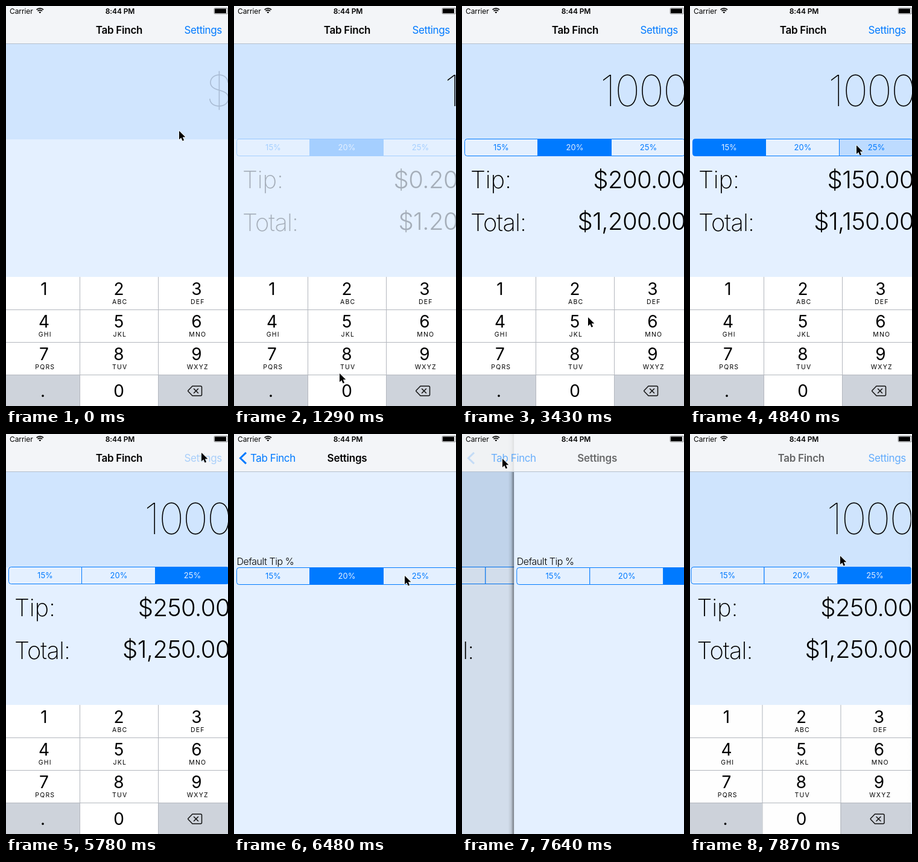
Animation, 368 px wide and 663 px high, one loop 7.99 s. Source, as an HTML page:

```html
<!DOCTYPE html>
<html lang="en">
<head>
<meta charset="utf-8">
<title>Tip calculator</title>
<style>
html, body { margin: 0; width: 100%; height: 100%; overflow: hidden; background: #e4f0ff; }
svg { display: block; width: 368px; height: 663px; font-family: Inter, Roboto, "Open Sans", sans-serif; }
text { white-space: pre; }
.mid { text-anchor: middle; }
.end { text-anchor: end; }
.bar { font-size: 17px; letter-spacing: -.4px; }
.bold { font-weight: 600; letter-spacing: -.25px; }
.blue { fill: #007aff; }
.status { font-size: 12px; letter-spacing: -.1px; }
.amount { font-size: 71px; font-weight: 100; letter-spacing: -2px; }
.label { font-size: 40px; font-weight: 200; }
.value { font-size: 40px; font-weight: 300; letter-spacing: -.6px; }
.digit { font-size: 28px; }
.letters { font-size: 10.5px; letter-spacing: 1.2px; }
.seg { font-size: 13px; }
</style>
</head>
<body>
<svg id="stage" viewBox="0 0 368 663">
  <defs>
    <linearGradient id="shade">
      <stop offset="0" stop-opacity="0"/>
      <stop offset=".5" stop-opacity=".12"/>
      <stop offset="1" stop-opacity=".6"/>
    </linearGradient>
  </defs>

  <g id="main">
    <rect width="375" height="663" fill="#e4f0ff"/>
    <rect y="63" width="375" height="158" fill="#d0e5fe"/>
    <text id="amount" class="amount end" x="373" y="166"></text>
    <g id="result">
      <g id="mainSeg" transform="translate(0 220)"></g>
      <text class="label" x="14" y="302" letter-spacing="-.2">Tip:</text>
      <text class="label" x="14" y="373" letter-spacing="-1">Total:</text>
      <text id="tip" class="value end" x="371" y="302"></text>
      <text id="total" class="value end" x="371" y="371"></text>
    </g>
    <g id="keys"></g>
  </g>
  <rect id="dim" width="368" height="663"/>

  <g id="settings">
    <rect id="edge" x="-10" width="10" height="663" fill="url(#shade)"/>
    <rect width="375" height="663" fill="#e4f0ff"/>
    <text x="4.5" y="217" font-size="16" font-weight="300" letter-spacing="-.45">Default Tip %</text>
    <g id="prefSeg" transform="translate(0 221)"></g>
  </g>

  <rect width="368" height="62" fill="#f7f7f7" fill-opacity=".82"/>
  <rect y="62" width="368" height="1" fill="#b4bfcd"/>
  <text class="status" x="6" y="12.5">Carrier</text>
  <g fill="none" stroke="#000" stroke-width="1.7">
    <path d="M50.6 6.2a8.2 8.2 0 0 1 11.4 0M52.6 8.4a5.3 5.3 0 0 1 7.4 0"/>
    <path d="M56.3 12.2l-1.9-2a2.8 2.8 0 0 1 3.8 0z" fill="#000" stroke="none"/>
  </g>
  <text class="status mid" x="189" y="12.5" font-weight="600">8:44 PM</text>
  <rect x="345" y="3.5" width="22.5" height="9.5" rx="1.5" fill="none" stroke="#666" stroke-width=".8"/>
  <rect x="346" y="4.5" width="19" height="7.5" rx=".5"/>

  <text id="mainTitle" class="bar bold mid" y="46">Tab Finch</text>
  <text id="prefButton" class="bar blue" x="295.5" y="46">Settings</text>
  <path id="chevron" d="M20 30.8L10.5 40l9.5 9.2" fill="none" stroke="#007aff" stroke-width="3"/>
  <text id="back" class="bar blue" y="46">Tab Finch</text>
  <text id="prefTitle" class="bar bold mid" y="46">Settings</text>

  <path id="cursor" d="M0 0V14.2L3.3 11.2L5.6 16.5L8.1 15.4L5.8 10.2H10.3Z" stroke="#fff" stroke-width="1.3" paint-order="stroke"/>
</svg>

<script>
const LOOP = 7990, WIDTH = 375;
const $ = id => document.getElementById(id);
const clamp = v => Math.max(0, Math.min(1, v));

function add(parent, tag, attrs, text) {
  const el = document.createElementNS("http://www.w3.org/2000/svg", tag);
  for (const k in attrs) el.setAttribute(k, attrs[k]);
  if (text) el.textContent = text;
  return parent.appendChild(el);
}
const set = (id, name, value) => $(id).setAttribute(name, value);
const alpha = (id, value) => set(id, "opacity", value);
const shift = (id, x, y = 0) => set(id, "transform", `translate(${x} ${y})`);

// Segmented control: returns a function that shows the chosen and pressed parts
const RATES = [15, 20, 25];
function segments(parent) {
  const paths = [
    "M125.5 .5H8.5a4 4 0 0 0-4 4V24.500a4 4 0 0 0 4 4H125.500Z",
    "M125.500 .5H247.500V28.500H125.500Z",
    "M247.500 .5H365.500a4 4 0 0 1 4 4V24.500a4 4 0 0 1-4 4H247.500Z"
  ];
  const cells = RATES.map((rate, i) => [
    add(parent, "path", { d: paths[i], stroke: "#007aff" }),
    add(parent, "text", { class: "seg mid", x: 65 + 122 * i, y: 19 }, rate + "%")
  ]);
  return (chosen, pressed) => cells.forEach(([box, text], i) => {
    box.setAttribute("fill", i === chosen ? "#007aff" : i === pressed ? "#bddbff" : "#e4f0ff");
    text.setAttribute("fill", i === chosen ? "#e4f0ff" : "#007aff");
  });
}
const showMain = segments($("mainSeg"));
const showPref = segments($("prefSeg"));

// Keypad
const KEYS = ["1", "2 ABC", "3 DEF", "4 GHI", "5 JKL", "6 MNO", "7 PQRS", "8 TUV", "9 WXYZ", ".", "0", ""];
const COLS = [0, 122, 252, 375], CENTERS = [63, 187, 316];
const keyBox = {};
KEYS.forEach((key, i) => {
  const c = i % 3, r = Math.floor(i / 3), [digit, letters] = key.split(" ");
  const grey = r === 3 && c !== 1;
  keyBox[digit] = add($("keys"), "rect", {
    x: COLS[c], y: 449 + 54 * r, width: COLS[c + 1] - COLS[c], height: 54,
    fill: grey ? "#ced3db" : "#fff"
  });
  const x = CENTERS[c] - (digit === "." ? 2 : 0);
  if (digit) add($("keys"), "text", { class: "digit mid", x, y: r === 3 ? 648 : 479 + 54 * r }, digit);
  if (letters) add($("keys"), "text", { class: "letters mid", x: CENTERS[c] + 1.8, y: 494 + 54 * r }, letters);
});
for (const x of [122, 252]) add($("keys"), "rect", { x, y: 449, width: 1, height: 214, fill: "#b3b7be" });
for (const y of [503, 557, 611]) add($("keys"), "rect", { y, width: 375, height: 1, fill: "#b3b7be" });
add($("keys"), "path", {
  d: "M309 630H322.500a2 2 0 0 1 2 2V644a2 2 0 0 1-2 2H309L302 638.800a1.200 1.200 0 0 1 0-1.600ZM311.500 634.500l7 7m0-7l-7 7",
  fill: "none", stroke: "#111", "stroke-width": 1.5, "stroke-linejoin": "round", "stroke-linecap": "round"
});

// Moments at which the picture updates: [first, last, count]
const RUNS = [[470, 710, 3], [950, 1640, 7], [1760, 1880, 2], [3430, 3900, 5], [4130, 4840, 7],
  [4960, 5660, 7], [5780, 6480, 7], [6600, 7300, 7], [7420, 7870, 5]];
const TICKS = [0];
for (const [from, to, n] of RUNS)
  for (let i = 0; i < n; i++) TICKS.push(Math.floor((from + (to - from) * i / (n - 1)) / 10) * 10);

// Pointer path: [time, x, y]
const POINTER = [[0, 287, 207], [360, 287, 207], [590, 150, 385], [710, 86, 457], [1070, 86, 457],
  [1290, 175, 609], [1410, 178, 625], [3310, 178, 625], [3430, 209, 516], [3550, 250, 400], [3670, 261, 300],
  [3780, 190, 245], [3900, 123, 230], [4370, 123, 230], [4720, 276, 231], [5080, 276, 231],
  [5540, 322, 34], [5660, 324, 31], [6010, 324, 31], [6360, 285, 225], [6480, 283, 235],
  [6720, 283, 235], [7180, 80, 60], [7300, 67, 42], [7640, 67, 41], [7870, 249, 202]];
function pointer(t) {
  const i = POINTER.findIndex(p => p[0] > t);
  if (i < 0) return POINTER[POINTER.length - 1].slice(1);
  const [t0, x0, y0] = POINTER[i - 1], [t1, x1, y1] = POINTER[i];
  const k = (t - t0) / (t1 - t0);
  return [x0 + (x1 - x0) * k, y0 + (y1 - y0) * k];
}

// Value of the last step reached
const step = (table, t) => table.filter(s => s[0] <= t).pop()[1];
const AMOUNT = [[0, ""], [1070, "1"], [1520, "10"], [1640, "100"], [1760, "1000"]];
const PRESSED_KEY = [[0, ""], [950, "1"], [1070, ""], [1410, "0"], [1520, ""], [1640, "0"], [1880, ""]];
const MAIN_RATE = [[0, 1], [4250, 0], [4960, 2]];
const MAIN_PRESS = [[0, -1], [4130, 0], [4250, -1], [4840, 2], [4960, -1]];
const PREF_RATE = [[0, 1], [6720, 2]];
const PREF_PRESS = [[0, -1], [6600, 2], [6720, -1]];
const PUSH = 5900, POP = 7640;

const money = v => "$" + v.toLocaleString("en-US", { minimumFractionDigits: 2, maximumFractionDigits: 2 });
const ease = (t, start) => t < start ? 0 : 1 - Math.exp(-(t - start + 17) / 65);

function drawNav(t) {
  const popping = t >= POP;
  let open = popping ? 1 - ease(t, POP) : ease(t, PUSH);
  if (!popping && t > PUSH + 400) open = 1;

  shift("main", -0.3 * WIDTH * open);
  shift("settings", WIDTH * (1 - open));
  alpha("dim", 0.1 * open);
  alpha("edge", open > 0 && open < 1 ? open : 0);
  set("settings", "visibility", open > 0 ? "visible" : "hidden");
  set("keys", "visibility", t >= POP && t < POP + 100 ? "hidden" : "visible");

  const start = popping ? POP : PUSH;
  const fadeIn = clamp((t - start) / 390);
  const fadeOut = t < start ? 1 : clamp(1 - (t - start + 100) / 230);
  const mainBar = popping ? fadeIn : fadeOut;
  const prefBar = popping ? fadeOut : fadeIn;
  const slide = 122 * Math.pow(1 - open, 1.2);
  set("mainTitle", "x", 65.5 + slide);
  set("back", "x", 27 + slide);
  set("prefTitle", "x", 187.5 + 159 * (1 - open));
  alpha("mainTitle", mainBar);
  alpha("prefButton", t >= 5780 && t < PUSH ? 0.3 : mainBar);
  alpha("back", prefBar);
  alpha("prefTitle", prefBar);
  alpha("chevron", prefBar ** 3);
}

function draw(t) {
  const typed = step(AMOUNT, t), rate = step(MAIN_RATE, t), key = step(PRESSED_KEY, t);
  const bill = Number(typed), tip = bill * RATES[rate] / 100;
  $("amount").textContent = typed || "$";
  set("amount", "fill", typed ? "#000" : "#a9bbd3");
  $("tip").textContent = money(tip);
  $("total").textContent = money(bill + tip);
  alpha("result", clamp((t - 1070) / 810));
  showMain(rate, step(MAIN_PRESS, t));
  showPref(step(PREF_RATE, t), step(PREF_PRESS, t));
  for (const k of ["0", "1"]) keyBox[k].setAttribute("fill", k === key ? "#ced3db" : "#fff");
  drawNav(t);
  shift("cursor", ...pointer(t));
}

const begin = performance.now();
let shown = -1;
function frame() {
  const now = (performance.now() - begin) % LOOP;
  const tick = TICKS.filter(t => t <= now).pop();
  if (tick !== shown) draw(shown = tick);
  requestAnimationFrame(frame);
}
frame();
</script>
</body>
</html>
```
